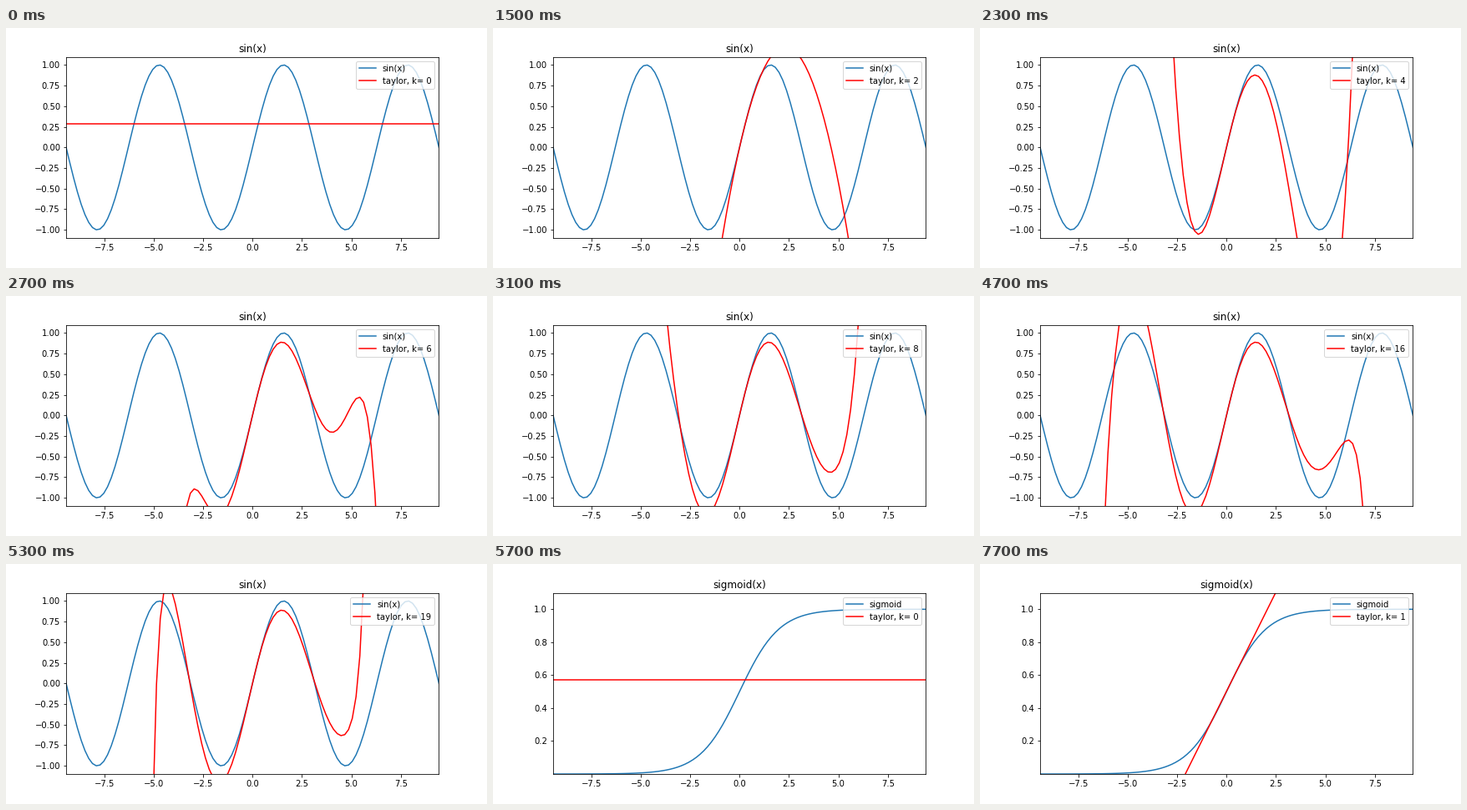
A matplotlib script that plays this animation: 576x288 px, repeating every 8000 ms.

```python
import math

import numpy as np
import matplotlib.pyplot as plt
from matplotlib.animation import FuncAnimation

TICK = 100  # ms per animation frame
LOOP = 8000
CENTRE = 51  # grid index of the expansion point
SIN_HOLDS = [500, 1000, 500, 300] + [200] * 17
SIGMOID_HOLDS = [2000, 300]

plt.rcParams.update({"font.family": "DejaVu Sans", "font.size": 10,
                     "figure.subplot.bottom": 0.125})

x = np.linspace(-3 * np.pi, 3 * np.pi, 100)
step = x[1] - x[0]


def taylor(y, order):
    """Taylor polynomial built from repeated forward differences."""
    total = np.zeros_like(x)
    deriv = y
    for n in range(order + 1):
        total = total + deriv[CENTRE] * (x - x[CENTRE]) ** n / math.factorial(n)
        deriv = np.diff(deriv) / step
    return total


def scene(title, label, y, holds):
    """One (title, label, y, order) entry per animation frame."""
    return [(title, label, y, k)
            for k, ms in enumerate(holds) for _ in range(ms // TICK)]


timeline = (scene("sin(x)", "sin(x)", np.sin(x), SIN_HOLDS)
            + scene("sigmoid(x)", "sigmoid", 1 / (1 + np.exp(-x)), SIGMOID_HOLDS))

fig, ax = plt.subplots(figsize=(8, 4), dpi=72)


def draw(frame):
    title, label, y, order = timeline[frame]
    ax.clear()
    ax.plot(x, y, color="tab:blue", label=label)
    ax.plot(x, taylor(y, order), color="red", label=f"taylor, k= {order}")
    ax.set_xlim(x[0], x[-1])
    ax.set_ylim(1.1 * y.min(), 1.1 * y.max())
    ax.set_title(title)
    ax.legend(loc="upper right")


anim = FuncAnimation(fig, draw, frames=LOOP // TICK, init_func=lambda: None,
                     interval=TICK, repeat=True, repeat_delay=0)
plt.show()
```
